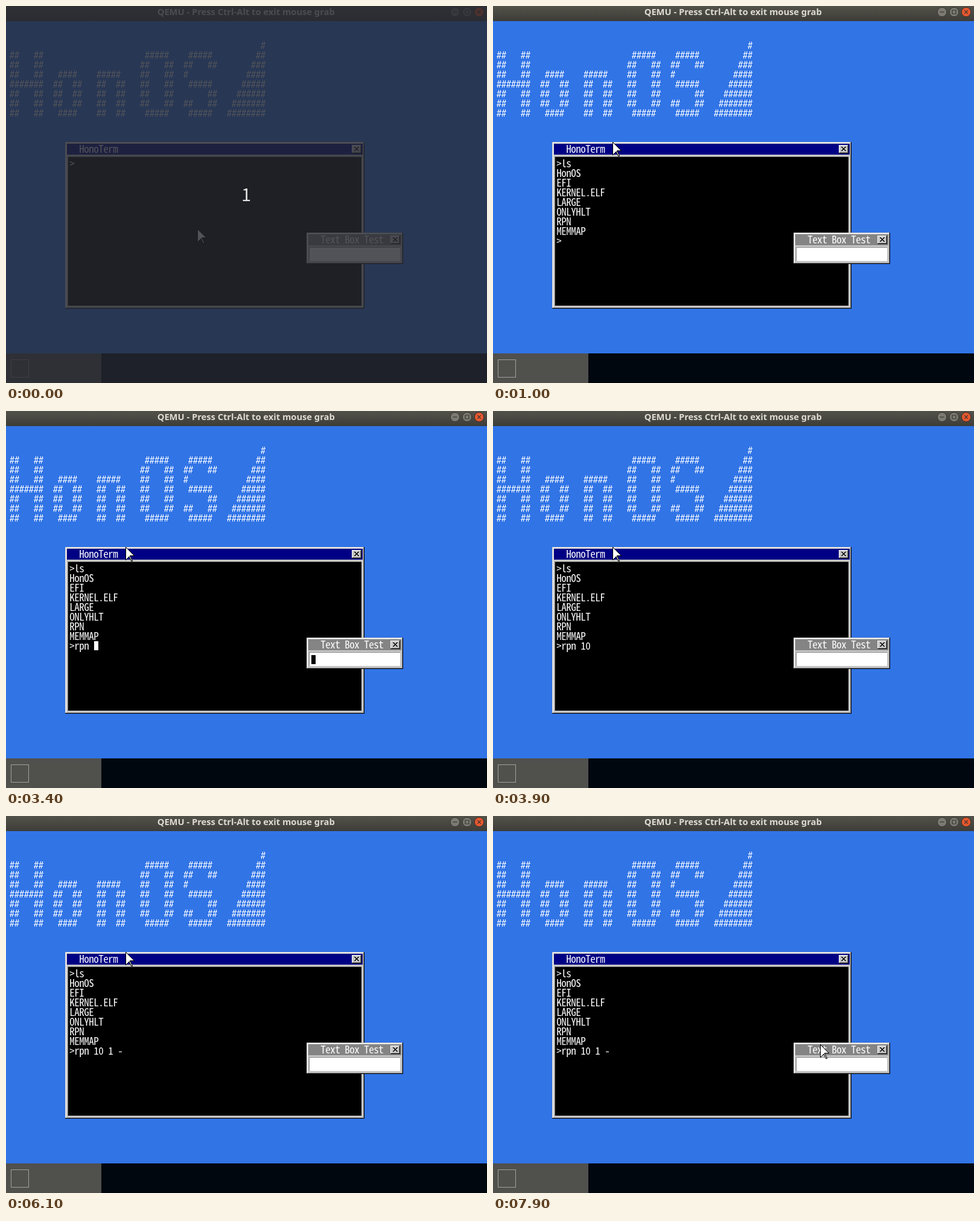
Write an HTML page with a canvas that moves like this. It is 797x624 px and loops after 8000 ms.

```html
<!DOCTYPE html>
<html lang="en">
<head>
<meta charset="utf-8">
<title>Terminal session</title>
<style>
html, body { margin: 0; width: 100%; height: 100%; overflow: hidden; background: #3174e6; }
canvas { display: block; width: 797px; height: 624px; }
</style>
</head>
<body>
<canvas id="stage" width="797" height="624"></canvas>
<script>
const ctx = document.getElementById("stage").getContext("2d");
const LOOP = 8000;
const CELL_W = 8, CELL_H = 16;
const MONO = '300 17px "Noto Sans Mono CJK JP", "Noto Sans Mono CJK SC", "Noto Sans Mono", monospace';
const FACE = "#c6c6c6", SHADE = "#848484", WHITE = "#ffffff", BLACK = "#000000";

const BANNER = [
  "                                                    #",
  "##   ##                     #####    #####         ##",
  "##   ##                    ##   ##  ##   ##       ###",
  "##   ##   ####    #####    ##   ##  #            ####",
  "#######  ##  ##   ##  ##   ##   ##   #####      #####",
  "##   ##  ##  ##   ##  ##   ##   ##       ##    ######",
  "##   ##  ##  ##   ##  ##   ##   ##  ##   ##   #######",
  "##   ##   ####    ##  ##    #####    #####   ########"
];
const LISTING = [">ls", "HonOS", "EFI", "KERNEL.ELF", "LARGE", "ONLYHLT", "RPN", "MEMMAP"];

// start time, typed text, terminal caret, text box caret
const STEPS = [
  [0, "", 0, 0], [400, "", 1, 1], [600, "l", 1, 1], [700, "ls", 1, 1],
  [900, "", 1, 1], [1000, "", 0, 0], [1500, "", 1, 1], [1900, "", 0, 0],
  [2400, "r", 1, 1], [2500, "rp", 1, 1], [2800, "rpn", 1, 1], [2900, "rpn ", 0, 0],
  [3400, "rpn ", 1, 1], [3700, "rpn 1", 1, 1], [3800, "rpn 10", 1, 1], [3900, "rpn 10", 0, 0],
  [4500, "rpn 10", 1, 1], [4600, "rpn 10 ", 1, 1], [5000, "rpn 10 ", 0, 0],
  [5100, "rpn 10 1", 1, 0], [5400, "rpn 10 1 ", 1, 1], [5600, "rpn 10 1 -", 1, 1],
  [5900, "rpn 10 1 -", 1, 0], [6100, "rpn 10 1 -", 0, 0], [6400, "rpn 10 1 -", 0, 1],
  [6900, "rpn 10 1 -", 0, 0], [7400, "rpn 10 1 -", 0, 1], [7900, "rpn 10 1 -", 0, 0]
];
const POINTER_PATH = [[0, 317, 369], [400, 198, 225], [7700, 270, 257], [7800, 430, 328], [7900, 542, 378]];

const CROSS = ["@@    @@", " @@  @@ ", "  @@@@  ", "   @@   ", "  @@@@  ", " @@  @@ ", "@@    @@"];
const ARROW = ["@"];
for (let i = 1; i < 14; i++) ARROW.push("@" + ".".repeat(i - 1) + "@");
ARROW.push(
  "@......@@@@@@@@", "@......@", "@....@@.@", "@...@ @.@", "@..@   @.@",
  "@.@    @.@", "@@      @.@", "@       @.@", "         @.@", "         @@@"
);

function box(x, y, w, h, color) {
  ctx.fillStyle = color;
  ctx.fillRect(x, y, w, h);
}

function bitmap(rows, x, y) {
  rows.forEach((row, dy) => [...row].forEach((c, dx) => {
    if (c !== " ") box(x + dx, y + dy, 1, 1, c === "@" ? BLACK : WHITE);
  }));
}

// One character per 8 x 16 cell
function write(text, x, y) {
  ctx.font = MONO;
  ctx.textAlign = "center";
  ctx.fillStyle = WHITE;
  [...text].forEach((c, i) => {
    if (c !== " ") ctx.fillText(c, x + i * CELL_W + 3.5, y + 14);
  });
}

// Slanted hash: two stepped stems crossed by two bars
function hash(x, y) {
  for (let step = 0; step < 3; step++) {
    box(x + 3 - step, y + 2 + step * 4, 1, 4, WHITE);
    box(x + 6 - step, y + 2 + step * 4, 1, 4, WHITE);
  }
  box(x + 1, y + 5, 7, 1, WHITE);
  box(x, y + 10, 7, 1, WHITE);
}

function closeButton(x, y) {
  box(x, y, 16, 14, BLACK);
  box(x, y, 15, 13, WHITE);
  box(x + 1, y + 1, 14, 12, SHADE);
  box(x + 1, y + 1, 13, 11, FACE);
  bitmap(CROSS, x + 4, y + 3);
}

function panel(x, y, w, h, title, bar, inside) {
  box(x, y, w, h, BLACK);
  box(x, y, w - 1, h - 1, FACE);
  box(x + 1, y + 1, w - 2, h - 2, SHADE);
  box(x + 1, y + 1, w - 3, h - 3, WHITE);
  box(x + 2, y + 2, w - 4, h - 4, FACE);
  box(x + 3, y + 3, w - 6, 18, bar);
  write(title, x + 24, y + 4);
  closeButton(x + w - 21, y + 5);
  box(x + 4, y + 24, w - 9, h - 29, SHADE);
  box(x + 5, y + 25, w - 9, h - 29, FACE);
  box(x + 5, y + 25, w - 10, h - 30, inside);
}

function roundButton(x, fill, edge, mark) {
  ctx.beginPath();
  ctx.arc(x, 10, 7.7, 0, Math.PI * 2);
  ctx.fillStyle = fill;
  ctx.fill();
  ctx.lineWidth = 1;
  ctx.strokeStyle = edge;
  ctx.stroke();
  ctx.beginPath();
  mark(x);
  ctx.strokeStyle = "#35342f";
  ctx.lineWidth = 1.2;
  ctx.stroke();
}

function titleBar() {
  const shade = ctx.createLinearGradient(0, 0, 0, 25);
  shade.addColorStop(0, "#53524a");
  shade.addColorStop(1, "#3d3c37");
  box(0, 0, 797, 25, shade);
  ctx.font = 'bold 14.7px "Noto Sans", "Open Sans", sans-serif';
  ctx.textAlign = "center";
  ctx.fillStyle = "#dfdbd2";
  ctx.fillText("QEMU - Press Ctrl-Alt to exit mouse grab", 397.7, 15);
  roundButton(744, "#7c7a72", "#34332e", x => { ctx.moveTo(x - 3.5, 10); ctx.lineTo(x + 3.5, 10); });
  roundButton(764, "#7c7a72", "#34332e", x => ctx.rect(x - 3, 7, 6, 6));
  roundButton(784, "#e6582f", "#3b2e27", x => {
    ctx.moveTo(x - 2.8, 7.2); ctx.lineTo(x + 2.8, 12.8);
    ctx.moveTo(x + 2.8, 7.2); ctx.lineTo(x - 2.8, 12.8);
  });
}

function desktop() {
  box(0, 25, 797, 550, "#3174e6");
  BANNER.forEach((row, r) => [...row].forEach((c, col) => {
    if (c === "#") hash(6 + col * CELL_W, 57 + r * CELL_H);
  }));
  box(0, 575, 797, 49, "#01070f");
  box(0, 575, 158, 49, "#50504d");
  ctx.strokeStyle = "#a0a09e";
  ctx.lineWidth = 1;
  ctx.strokeRect(8.5, 585.5, 29, 29);
}

function countdown() {
  box(0, 0, 797, 624, "rgba(38, 41, 48, 0.8)");
  ctx.font = '29px "Noto Sans CJK JP", "DejaVu Sans", sans-serif';
  ctx.textAlign = "center";
  ctx.fillStyle = "#e2e2e2";
  ctx.fillText("1", 398, 323);
}

function latest(list, t) {
  return list.filter(item => item[0] <= t).pop();
}

function draw(t) {
  const [, typed, caret, boxCaret] = latest(STEPS, t);
  const [, px, py] = latest(POINTER_PATH, t);
  const lines = t < 900 ? [] : LISTING;
  const promptY = 253 + lines.length * CELL_H;

  titleBar();
  desktop();
  panel(98, 225, 496, 276, "HonoTerm", "#000084", BLACK);
  [...lines, ">" + typed].forEach((line, i) => write(line, 106, 253 + i * CELL_H));
  if (caret) box(114 + typed.length * CELL_W, promptY, 7, 15, WHITE);
  panel(498, 375, 160, 52, "Text Box Test", SHADE, WHITE);
  if (boxCaret) box(506, 404, 7, 15, BLACK);
  bitmap(ARROW, px, py);
  if (t < 400) countdown();
}

const start = performance.now();
function tick() {
  draw((performance.now() - start) % LOOP);
  requestAnimationFrame(tick);
}
tick();
</script>
</body>
</html>
```
